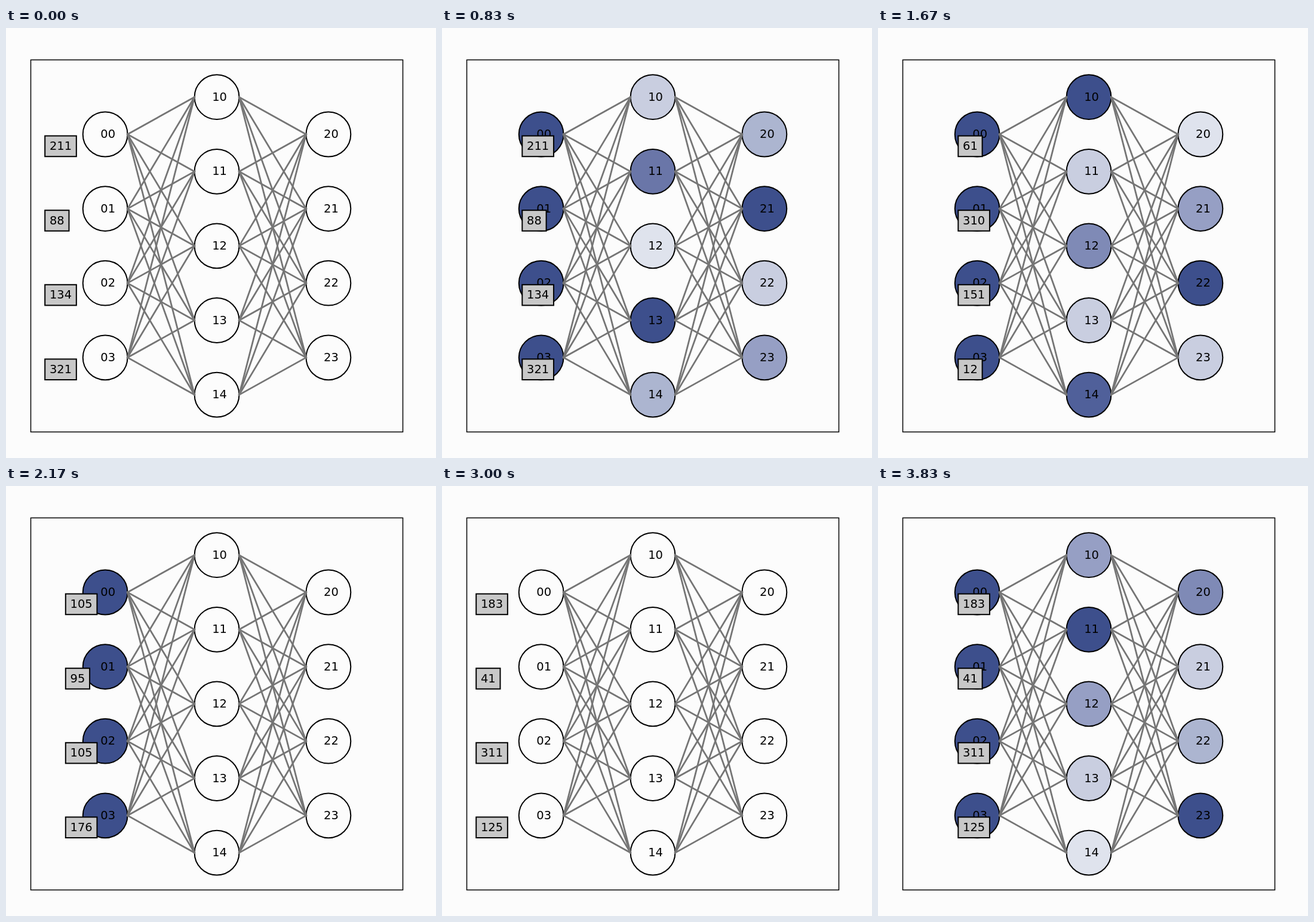
Recreate the animation shown at these times as an HTML page. Size 720 by 720 pixels, loop 3990 ms.

```html
<!DOCTYPE html>
<html lang="en">
<head>
<meta charset="utf-8">
<title>Neural network forward pass</title>
<style>
  html, body { margin: 0; width: 100%; height: 100%; overflow: hidden; background: #fcfcfc; }
  svg { display: block; width: 100vw; height: 100vh; }
  text { font: 19.44px "DejaVu Sans", sans-serif; fill: #000; }
  .frame { fill: none; stroke: #000; stroke-width: 1.5; }
  .node { stroke: #000; stroke-width: 2; }
  .edge { stroke: #757575; stroke-width: 2.8; stroke-linecap: square; }
  .box { fill: #c8c8c8; stroke: #000; stroke-width: 2; }
</style>
</head>
<body>
<svg id="stage" viewBox="0 0 720 720"></svg>
<script>
const LOOP = 3990, CYCLE = 1000;
const STEPS = [0, 170, 330, 500, 670];
const SIDE = 623, LEFT = 41.5, TOP = 53.4, RADIUS = 0.06 * SIDE, GAP = 0.2 * SIDE;
const FONT = 19.44, DIGIT = 0.636 * FONT, PAD = 0.4 * FONT;
const BLANK = '#fcfcfc';
// From strongest to weakest activation
const SHADES = ['#3d4f8c', '#50609a', '#6a76a8', '#7f8ab6', '#969fc4', '#acb5d0', '#c9cee0', '#dfe3ed'];

// Each digit of hidden / output is an index into SHADES
const PASSES = [
  { inputs: [211, 88, 134, 321], hidden: '62705', output: '5064', start: 65.2 },
  { inputs: [61, 310, 151, 12], hidden: '06361', output: '7406', start: 65.2 },
  { inputs: [105, 95, 105, 176], hidden: '46053', output: '0536', start: 65.2 },
  { inputs: [183, 41, 311, 125], hidden: '40467', output: '3650', start: 57.2 }
];

const stage = document.getElementById('stage');

function add(tag, attrs, content = '') {
  const el = document.createElementNS('http://www.w3.org/2000/svg', tag);
  for (const key in attrs) el.setAttribute(key, attrs[key]);
  el.textContent = content;
  return stage.appendChild(el);
}

add('rect', { class: 'frame', x: LEFT, y: TOP, width: SIDE, height: SIDE });

const layers = [[0.2, 4], [0.5, 5], [0.8, 4]].map(([fx, count]) =>
  Array.from({ length: count }, (_, i) => ({
    x: LEFT + fx * SIDE,
    y: TOP + SIDE / 2 + (i - (count - 1) / 2) * GAP
  })));

layers.flat().forEach(n => {
  n.circle = add('circle', { class: 'node', cx: n.x, cy: n.y, r: RADIUS, fill: BLANK });
});

for (let k = 0; k < 2; k++)
  for (const a of layers[k])
    for (const b of layers[k + 1])
      add('line', { class: 'edge', x1: a.x + RADIUS, y1: a.y, x2: b.x - RADIUS, y2: b.y });

layers.forEach((layer, k) => layer.forEach((n, i) =>
  add('text', { x: n.x - 7.8, y: n.y + 6 }, `${k}${i}`)));

const boxes = layers[0].map(n => ({
  rect: add('rect', { class: 'box', y: n.y + 2.6, height: 34.6 }),
  label: add('text', { y: n.y + 26 })
}));

function paint(layer, shades) {
  layer.forEach((n, i) => n.circle.setAttribute('fill', shades ? SHADES[shades[i]] : BLANK));
}

let shown = '';

function draw(now) {
  const t = now % LOOP;
  const index = Math.min(Math.floor(t / CYCLE), PASSES.length - 1);
  const step = STEPS.filter(s => s <= t - index * CYCLE).length - 1;
  const state = `${index}:${step}`;
  if (state !== shown) {
    shown = state;
    const pass = PASSES[index];
    const x = [pass.start, 99.8, 134.3][Math.min(step, 2)];
    boxes.forEach(({ rect, label }, i) => {
      const value = String(pass.inputs[i]);
      rect.setAttribute('x', x);
      rect.setAttribute('width', value.length * DIGIT + 2 * PAD);
      label.setAttribute('x', x + PAD);
      label.textContent = value;
    });
    paint(layers[0], step >= 1 && '0000');
    paint(layers[1], step >= 3 && pass.hidden);
    paint(layers[2], step >= 4 && pass.output);
  }
}

const origin = performance.now();
function tick() {
  draw(performance.now() - origin);
  requestAnimationFrame(tick);
}
tick();
</script>
</body>
</html>
```
